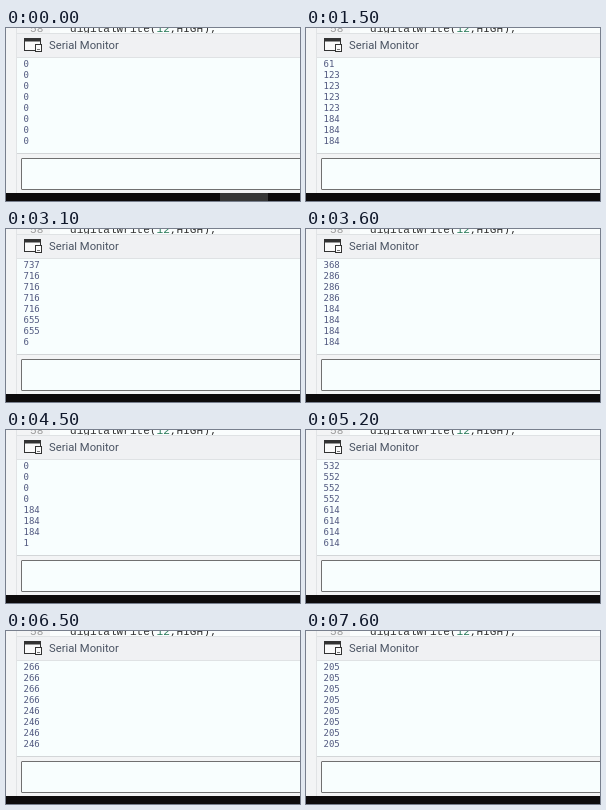
An HTML page that plays this animation: 294x173 px, repeating every 8100 ms.

```html
<!DOCTYPE html>
<html lang="en">
<head>
<meta charset="utf-8">
<title>Serial Monitor</title>
<style>
  html, body { margin: 0; width: 100%; height: 100%; overflow: hidden; }
  svg { display: block; }
  text { white-space: pre; }
  .code { font: 11.1px "Liberation Mono", monospace; fill: #333; }
  .title { font: 11.25px Roboto, sans-serif; fill: #4a5362; }
  #log { font: 9px "DejaVu Sans Mono", monospace; fill: #50587f; }
</style>
</head>
<body>
<svg width="294" height="173" viewBox="0 0 294 173">
  <rect width="294" height="173" fill="#f3f4f5"/>

  <rect x="44" width="250" height="6" fill="#fafdfd"/>
  <text class="code" x="24" y="4" style="fill:#999">58</text>
  <text class="code" x="64" y="4">digitalWrite(<tspan fill="#287a58">12</tspan>,HIGH);</text>

  <rect x="11" y="6" width="283" height="24" fill="#f0f1f3"/>
  <path d="M11 5.5H294M11 29.5H294" stroke="#dfe2e4"/>
  <g fill="#fafafa" stroke="#333">
    <rect x="18.5" y="10.5" width="16" height="12"/>
    <path d="M18 12H35" stroke-width="3"/>
    <rect x="29.5" y="16.5" width="6" height="7"/>
    <path d="M31 21.5H34" stroke="#777"/>
  </g>
  <text class="title" x="43" y="21">Serial Monitor</text>

  <rect x="11" y="30" width="283" height="95" fill="#f8fefe"/>
  <path d="M11 125.5H294" stroke="#d3d6d8"/>
  <path d="M10.5 0V165" stroke="#e1e3e5"/>
  <rect x="15.5" y="130.5" width="290" height="31" rx=".5" fill="#f8fefe" stroke="#707070"/>

  <rect y="165" width="294" height="8" fill="#0d0b0c"/>
  <rect id="task" x="214" y="165" width="48" height="8" fill="#363636"/>
  <g id="log"></g>
</svg>
<script>
const LOOP = 8100, TICK = 100, ROWS = 8;

// A dial with 50 steps is turned up and down twice: [tick, step]
const turns = [[12, 0], [22.5, 31.7], [26, 50], [29, 36], [30.5, 34.5], [38, 0],
  [44, 0], [45, 9], [50, 26], [51, 27], [54, 35], [63.8, 12.8], [71, 10]];

function dial(tick) {
  const next = turns.findIndex(([t]) => t > tick);
  if (next === 0) return 0;
  if (next < 0) return turns.at(-1)[1];
  const [t0, a] = turns[next - 1], [t1, b] = turns[next];
  return a + (b - a) * (tick - t0) / (t1 - t0);
}

const reading = tick => String(Math.round(Math.round(dial(tick)) * 1023 / 50));
const isStalled = tick => tick % 34 === 25 || tick % 34 === 0;
const isCutOff = tick => tick % 14 === 3;

// Each tick prints its reading three or four times
function visibleLines(tick) {
  const lines = [];
  for (let n = tick; lines.length < ROWS; n--) {
    const count = n % 4 === 3 ? 3 : 4;
    lines.unshift(...Array(count).fill(reading(n)));
  }
  const shown = lines.slice(-ROWS);
  if (isCutOff(tick)) shown[ROWS - 1] = shown[ROWS - 1][0];
  return shown;
}

const log = document.getElementById("log");
const task = document.getElementById("task");
const rows = Array.from({ length: ROWS }, (_, i) => {
  const row = document.createElementNS("http://www.w3.org/2000/svg", "text");
  row.setAttribute("x", 17.5);
  row.setAttribute("y", 39 + 11 * i);
  return log.appendChild(row);
});

let start, last;
function draw(now) {
  start ??= now;
  let tick = Math.floor(Math.max(0, now - start) % LOOP / TICK);
  if (tick && isStalled(tick)) tick--;
  if (tick !== last) {
    visibleLines(tick).forEach((line, i) => rows[i].textContent = line);
    task.style.display = tick < 13 ? "" : "none";
    last = tick;
  }
  requestAnimationFrame(draw);
}
draw(performance.now());
</script>
</body>
</html>
```
